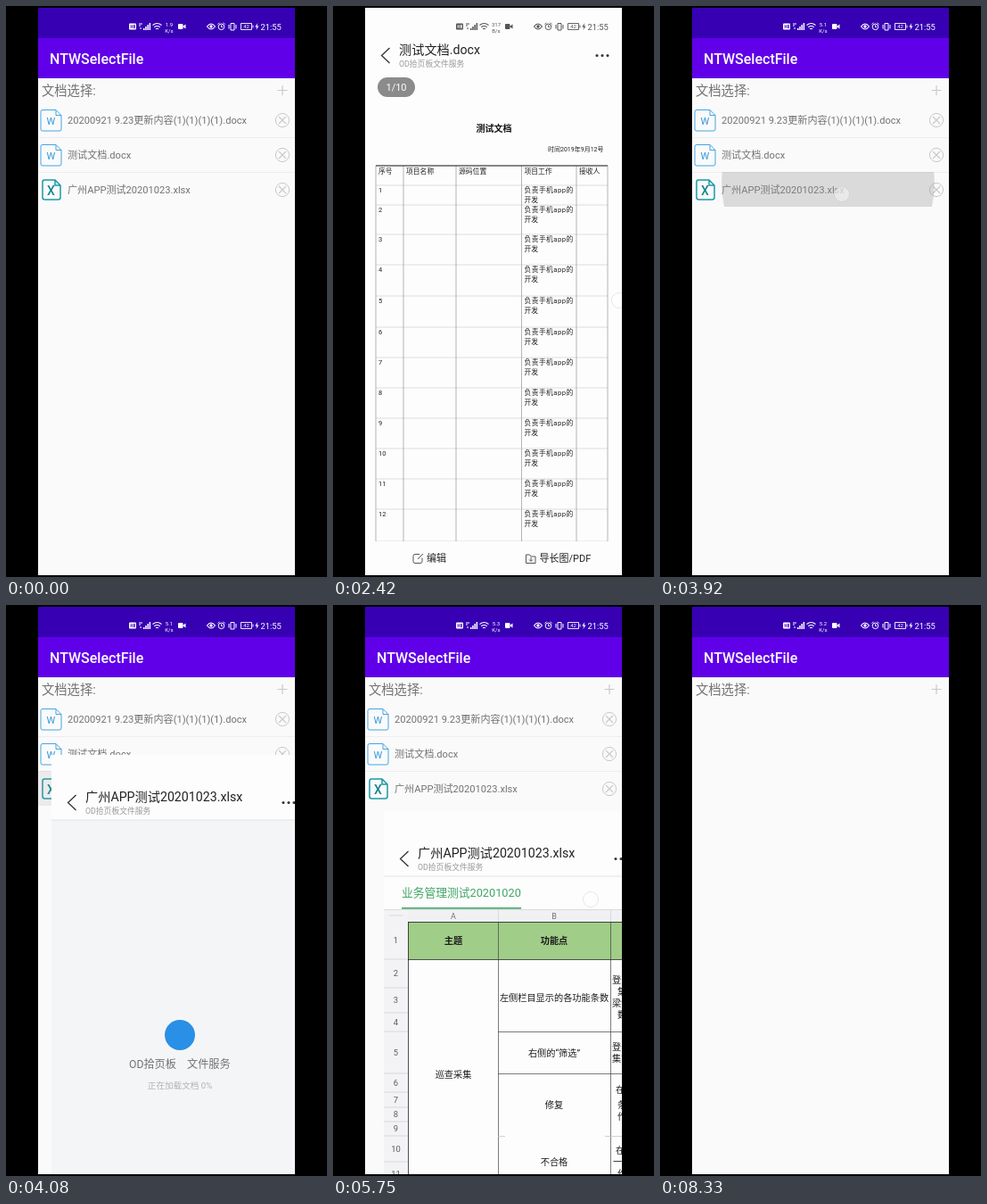
These frames come from a looping animation (360 px wide and 640 px high, 8760 ms). An HTML page:

```html
<!DOCTYPE html>
<html lang="zh">
<head>
<meta charset="utf-8">
<style>
html, body { margin: 0; width: 100%; height: 100%; overflow: hidden; background: #000; }
svg { display: block; width: 360px; height: 640px; }
text { font-family: Roboto, "Noto Sans CJK SC", "Noto Sans CJK", sans-serif; }
</style>
</head>
<body>
<svg id="stage" viewBox="0 0 360 640" xmlns="http://www.w3.org/2000/svg"></svg>
<script>
const LOOP = 8760, STEP = 1000 / 12;
const INK = '#222', SOFT = '#727272', PAPER = '#fdfdfe', LINE = '#d9d9de', FAINT = '#c9c9cc';
const FILES = ['20200921 9.23更新内容(1)(1)(1)(1).docx', '测试文档.docx', '广州APP测试20201023.xlsx'];

const text = (x, y, size, fill, str, extra = '') =>
  `<text x="${x}" y="${y}" font-size="${size}" fill="${fill}" ${extra}>${str}</text>`;
const mid = (x, y, size, fill, str, extra = '') =>
  text(x, y, size, fill, str, 'text-anchor="middle" ' + extra);
const rect = (x, y, w, h, fill, extra = '') =>
  `<rect x="${x}" y="${y}" width="${w}" height="${h}" fill="${fill}" ${extra}/>`;
const path = (d, stroke, width = 1, extra = '') =>
  `<path d="${d}" fill="none" stroke="${stroke}" stroke-width="${width}" ${extra}/>`;

function statusBar() {
  const bars = [0, 1, 2, 3].map(i => rect(154 + i * 2.2, 25 - i * 2, 1.5, 2 + i * 2, 'currentColor')).join('');
  return `<g id="status">
    ${rect(138, 19.5, 8, 7, 'currentColor', 'rx="1"')}
    <path id="hd" d="M140 21v4M142 21v4M140 23h2M143.5 21.3v3.4h1v-3.4z" fill="none" stroke-width=".7"/>
    ${path('M149 20h4M149 22h2M150 25h2', 'currentColor')}${bars}
    ${path('M164.5 21.5q5-4 10 0M166.3 23.8q3.2-2.6 6.4 0M168 25.8q1.5-1.2 3 0', 'currentColor', 1.1)}
    ${mid(183, 22.5, 6, 'currentColor', '', 'id="rate"')}
    ${mid(183, 29.5, 6, 'currentColor', '', 'id="unit"')}
    ${rect(193, 20, 5.5, 6, 'currentColor', 'rx="1"')}<path d="M198 23l3.5-2.5v5z" fill="currentColor"/>
    ${path('M225.5 23q4.5-6 9 0q-4.5 6-9 0z', 'currentColor', 1.1)}<circle cx="230" cy="23" r="1.7" fill="currentColor"/>
    <circle cx="241.5" cy="23.3" r="3.3" fill="none" stroke="currentColor"/>
    ${path('M241.5 21.3v2.2h1.6M237.5 20.5l2-1.8M245.5 20.5l-2-1.8', 'currentColor', .9)}
    ${path('M252 19.5h4v7.5h-4zM250 21v4.5M258 21v4.5', 'currentColor')}
    ${path('M263.5 19.5h12v7h-12zM277 21.5v3', 'currentColor', .9)}${mid(269.5, 25.4, 6, 'currentColor', '42')}
    <path d="M282.3 19l-3 4.4h2l-.8 3.6 3-4.6h-2z" fill="currentColor"/>
    ${text(285.5, 26.7, 9.4, 'currentColor', '21:55')}
  </g>`;
}

function fileRow(name, i) {
  const icon = i < 2
    ? path('M41 116.5h15l6 6v15.5q0 2-2 2h-19q-2 0-2-2v-19.5q0-2 2-2zM56 116.5v6h6', '#45a5e2')
      + mid(50.3, 133, 11, '#2f96d8', 'W')
    : path('M43 117h12l6 6v13.5q0 2.5-2.5 2.5h-15q-2.5 0-2.5-2.5v-17q0-2.5 2-2.5zM55 117v6h6', '#1a9ba6', 1.5)
      + mid(50.5, 134, 14, '#128692', 'X', 'font-weight="500"');
  return `<g class="row">${icon}${text(69, 132, 11.1, SOFT, name)}
    <circle cx="310" cy="128" r="7.6" fill="none" stroke="${FAINT}"/>
    ${path('M306 124l8 8M314 124l-8 8', FAINT, 1.1)}
    ${i < 2 ? rect(36, 147, 288, 1, '#ededee') : ''}</g>`;
}

function listScreen() {
  return rect(36, 2, 288, 636, '#fafafb') + rect(36, 2, 288, 34, '#3700b3') + rect(36, 36, 288, 45, '#6000e8')
    + text(49, 65, 16, '#fff', 'NTWSelectFile', 'font-weight="500"')
    + text(40, 100, 14.3, SOFT, '文档选择:')
    + path('M304.5 94.5h11M310 89v11', FAINT, 1.2)
    + FILES.map(fileRow).join('')
    + `<g id="rippleBox"><circle id="ripple" fill="#8e8e8e" opacity=".3"/></g>`;
}

function toolbar() {
  return rect(36, 600, 288, 38, PAPER)
    + path('M97 614.5h-5q-2 0-2 2v6q0 2 2 2h6q2 0 2-2v-4M95 620l6-6', '#555')
    + text(105, 623, 11, INK, '编辑')
    + path('M216.5 615h4l1.5 2h5v7.5h-10.5zM222 618v4M220 620.5l2 2 2-2', '#555')
    + text(231.5, 623, 11, INK, '导长图/PDF');
}

function loading() {
  return `<g id="loading">${rect(36, 75, 288, 563, '#f4f5f6')}
    <circle cx="180" cy="316" r="17" fill="#2a8fe6"/>
    ${text(123, 353, 12.2, SOFT, 'OD拾页板')}${text(188, 353, 12.2, SOFT, '文件服务')}
    ${mid(180, 376, 9.6, '#b2b2b4', '正在加载文档 0%')}</g>`;
}

function docPage() {
  const xs = [48, 79, 138, 211.5, 273, 308];
  const ys = [179, 201, 223, 256, 290, 325, 360, 394, 428, 462, 496, 530, 564, 600];
  const heads = ['序号', '项目名称', '源码位置', '项目工作', '接收人'];
  let out = rect(36, 75, 288, 563, PAPER) + rect(50, 80, 42, 22, '#8b8b8b', 'rx="11"')
    + mid(71, 95, 11, '#fff', '1/10')
    + mid(180.5, 141, 10, '#111', '测试文档', 'font-weight="700"')
    + text(241, 162.5, 7, '#222', '时间2019年9月12号');
  out += path(ys.slice(1).map(y => `M48 ${y}H308`).join(''), '#c6c6cc', .6);
  out += path(xs.map(x => `M${x} 179V600`).join(''), '#85858f', .6) + path('M48 179H308', '#111', 1.2);
  heads.forEach((h, i) => { out += text(xs[i] + 3, 188, 7.8, '#222', h); });
  for (let i = 1; i < 13; i++) {
    const y = ys[i] + 8;
    out += text(51, y, 7.5, '#222', i) + text(214.5, y, 7.8, '#222', '负责手机app的', 'letter-spacing=".4"')
      + text(214.5, y + 10.5, 7.8, '#222', '开发');
  }
  return `<g id="doc">${out}${toolbar()}</g>`;
}

function sheetPage() {
  const ys = [126, 168, 200, 228, 249, 296, 317, 334, 350, 366, 395, 422, 458, 480, 504, 528, 557];
  const c = (x, y, s, extra) => mid(x, y + 3.8, 10.2, '#1c1c1c', s, extra);
  const l = (x, y, s) => text(x, y + 3.8, 10.2, '#1c1c1c', s);
  let out = rect(36, 75, 288, 563, PAPER)
    + text(56, 98, 12.75, '#3fa564', '业务管理测试20201020') + rect(56, 110, 134, 1.6, '#3fa564')
    + rect(36, 112, 288, 14, '#f1f1f3') + rect(36, 112, 27, 446, '#f3f3f5')
    + path('M36 112.5H324M42 119h15M164.5 112v14M290.5 112v14', LINE)
    + mid(114, 122.5, 9, SOFT, 'A') + mid(227, 122.5, 9, SOFT, 'B')
    + rect(63, 126, 261, 42, '#a0cd88');
  for (let i = 0; i < 16; i++)
    out += path(`M36 ${ys[i + 1]}H63`, LINE) + mid(49.5, (ys[i] + ys[i + 1]) / 2 + 3.3, 9.4, '#5c5c5c', i + 1);
  out += path('M63.5 126V422M63 126.5H324M63 168.5H324M63 422.5H324', '#222', .8)
    + path('M164.5 126V557M290.5 126V557M164 249.5H324M164 296.5H324M164 528.5H324', '#444', .7)
    + path('M164 366.5h8M284 366.5H324', '#c6c6cc', .8);
  const bold = 'font-weight="700"';
  out += c(114, 147, '主题', bold) + c(227, 147, '功能点', bold) + text(309.5, 150.8, 10.2, '#1c1c1c', '描述', bold);
  [[114, 297, '巡查采集'], [114, 551, '保障线路'], [227, 211, '左侧栏目显示的各功能条数'], [227, 273, '右侧的“筛选”'],
   [227, 331, '修复'], [227, 395, '不合格'], [227, 476, '选择位置上传']].forEach(a => { out += c(...a); });
  [[292, 191, '登录系统'], [298, 204, '集“查看'], [292, 217, '梁”、“隧'], [298, 230, '数与图'],
   [292, 266, '登录系统'], [292, 279, '集“点击'],
   [296, 314, '在“已提'], [298, 331, '条数据'], [298, 344, '作”里面'],
   [296, 382, '在“修复'], [293, 395, '一条数据'], [298, 408, '作”里面'],
   [296, 451, '在“保障'], [293, 464, '一条数据'], [298, 476, '害列表'], [293, 488, '害”出现'], [308, 500, '上传'],
   [303, 551, '点击']].forEach(a => { out += l(...a); });
  out += rect(36, 557.5, 288, 81, PAPER) + rect(42, 563, 276, 30, '#eeeef1') + text(49, 583, 12.5, '#b6b6ba', 'K23');
  return `<g id="sheet">${out}${toolbar()}</g>`;
}

function viewer() {
  return `<g id="viewer">${rect(36, 2, 288, 636, PAPER)}
    ${loading()}${docPage()}${sheetPage()}
    ${rect(36, 74.5, 288, 1, '#e4e4e8', 'id="edge"')}
    ${path('M63.5 47l-9 8.5 9 8.5', '#333', 1.3)}
    ${text(74, 54.3, 14.2, INK, '', 'id="title"')}
    ${text(74, 67.7, 8.8, '#9a9a9a', 'OD拾页板文件服务')}
    ${[296, 302, 308].map(x => `<circle cx="${x}" cy="55.5" r="1.5" fill="#333"/>`).join('')}</g>`;
}

const stage = document.getElementById('stage');
stage.innerHTML = `<defs>
  <clipPath id="screen">${rect(36, 2, 288, 636, '#000')}</clipPath>
  <clipPath id="rowClip"><rect id="rowRect" x="36" width="288" height="39"/></clipPath></defs>
  ${rect(0, 0, 360, 640, '#000')}
  <g clip-path="url(#screen)">${listScreen()}${viewer()}${statusBar()}
  <circle id="touch" r="8.5" stroke="#cfcfcf" stroke-width=".8"/></g>`;

const $ = id => document.getElementById(id);
const set = (el, attrs) => { for (const k in attrs) el.setAttribute(k, attrs[k]); };
const show = (el, on) => set(el, { display: on ? 'inline' : 'none' });
const clamp = v => Math.max(0, Math.min(1, v));
const rows = [...document.querySelectorAll('.row')];
$('rippleBox').setAttribute('clip-path', 'url(#rowClip)');

const VISITS = [
  { file: 1, tap: 670, ready: 1495, back: 2415, slide: 2462, page: 'doc' },
  { file: 2, tap: 3830, ready: 4495, back: 5495, slide: 5564, page: 'sheet' }
];
const REMOVALS = [[6830, 6995], [7495, 7660], [8080, 8245]];
const RATES = [[0, '1.9', 'K/s'], [670, '317', 'B/s'], [3665, '5.1', 'K/s'], [4495, '5.3', 'K/s'], [6665, '5.2', 'K/s']];

// Distance the viewer window sits below its open place.
function offset(v, t) {
  if (t < v.tap + 150) return 640;
  if (t < v.slide) return 640 * (1 - clamp((t - v.tap - 110) / 300)) ** 2;
  return 640 * clamp((t - v.slide) / 375) ** 1.51;
}

function draw(time) {
  const t = Math.floor((time + 5) / STEP) * STEP + 4;
  const v = t < 3400 ? VISITS[0] : VISITS[1];
  const dy = offset(v, t), open = dy < 640;

  show($('viewer'), open);
  set($('viewer'), { transform: `translate(${Math.round(dy / 11)} ${Math.round(dy)})` });
  $('title').textContent = FILES[v.file];
  const ready = t >= v.ready;
  show($('loading'), !ready);
  show($('doc'), ready && v.page === 'doc');
  show($('sheet'), ready && v.page === 'sheet');
  show($('edge'), !ready || v.page === 'sheet');

  const dark = dy < 20;
  set($('status'), { color: dark ? '#555' : '#fff' });
  set($('hd'), { stroke: dark ? '#fff' : '#3700b3' });
  const [, rate, unit] = RATES.filter(r => t >= r[0]).pop();
  $('rate').textContent = rate;
  $('unit').textContent = unit;

  const gone = REMOVALS.filter(r => t >= r[1]).length;
  rows.forEach((row, i) => {
    show(row, i >= gone);
    set(row, { transform: `translate(0 ${39 * (i - gone)})` });
  });

  const top = 108 + 39 * v.file, age = t - v.tap, pressed = age >= 0 && age < 330;
  show($('ripple'), pressed);
  if (pressed) {
    const k = clamp(age / 140);
    set($('rowRect'), { y: top });
    set($('ripple'), { cx: 204 - 24 * k, cy: top + 25 - 32 * k * (1 - k * .6), r: 35 + 0.93 * age,
      opacity: .3 * (1 - clamp((age - 170) / 160)) });
  }

  let touch = null;
  if (age >= 0 && age < 165) touch = [204, top + 25, '#f0f0f0', .7];
  if (t >= v.back && t < v.back + 330) touch = [322 - 33 * clamp((t - v.back) / 170), 330, '#fff', .6];
  if (REMOVALS.some(r => t >= r[0] && t < r[1])) touch = [311, 130, '#f0f0f0', .7];
  show($('touch'), touch);
  if (touch) set($('touch'), { cx: touch[0], cy: touch[1], fill: touch[2], opacity: touch[3] });
}

const start = performance.now();
function tick() {
  draw((performance.now() - start) % LOOP);
  requestAnimationFrame(tick);
}
draw(0);
requestAnimationFrame(tick);
</script>
</body>
</html>
```
